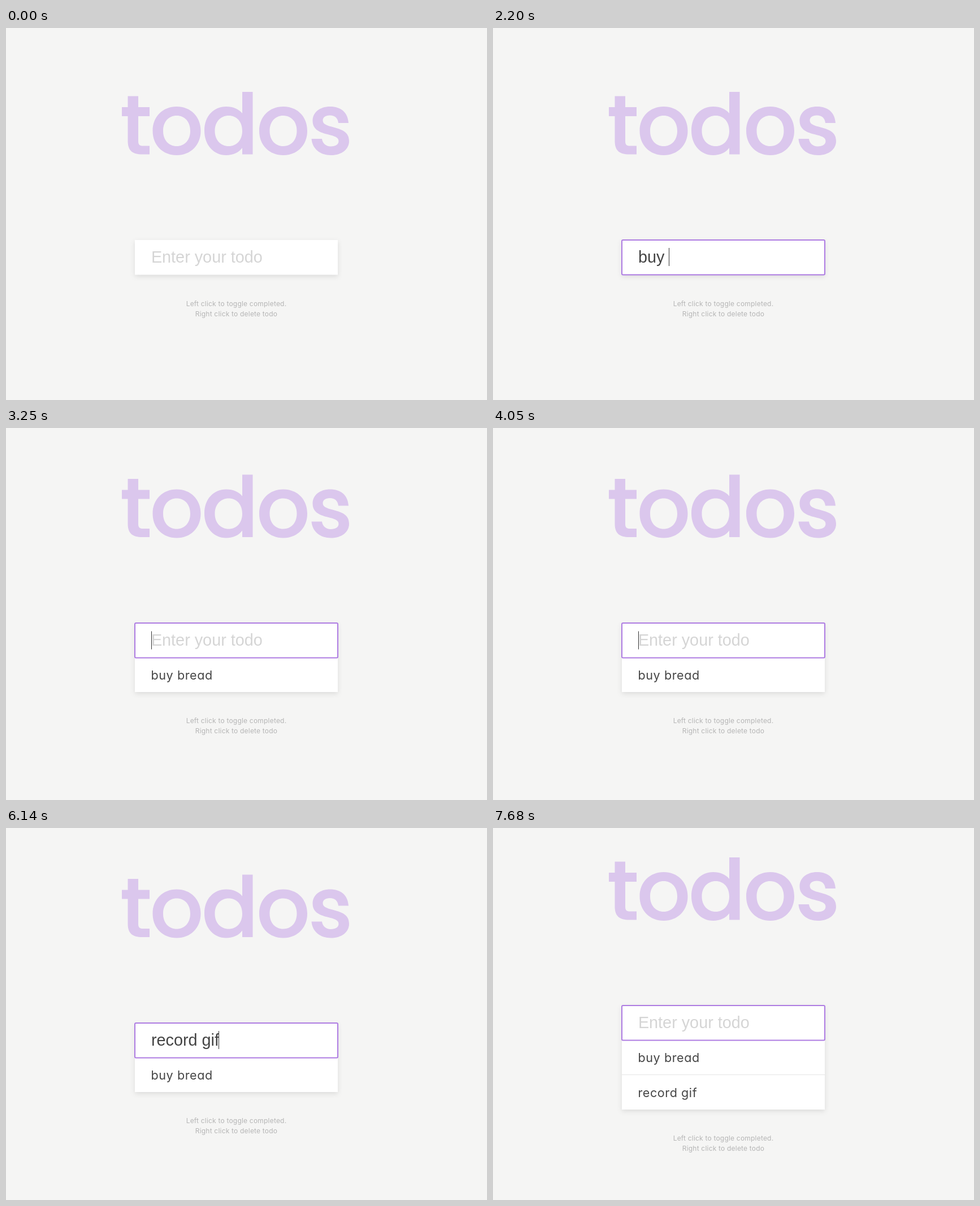
Recreate the animation shown at these times as an HTML page. Size 851 px wide and 658 px high, loop 8000 ms.

```html
<!DOCTYPE html>
<html lang="en">
<head>
<meta charset="utf-8">
<title>Todo list</title>
<style>
  html, body { margin: 0; width: 100%; height: 100%; overflow: hidden; background: #f5f5f4; }
  svg { display: block; width: 100%; height: 100%; }
  text { white-space: pre; }
  .heading { fill: #dbc7ed; }
  .card { fill: #fff; filter: drop-shadow(0 3.6px 4.5px rgba(0, 0, 0, .1)); }
  .ring { fill: none; stroke: #ae7ce2; stroke-width: 2; }
  .field { font: 28.8px "Liberation Sans", Arial, sans-serif; fill: #444; }
  .field.placeholder { fill: #d5d5d5; }
  .item { font: 21.6px Inter, "Open Sans", sans-serif; font-feature-settings: "cv11"; letter-spacing: .55px; fill: #444; }
  .hint { font: 12px Inter, "Open Sans", sans-serif; font-feature-settings: "cv11"; letter-spacing: .2px; fill: #b5b5b5; text-anchor: middle; }
</style>
</head>
<body>
<svg viewBox="0 0 851 658">
  <g id="heading" class="heading" fill-rule="evenodd" role="heading" aria-level="1" aria-label="todos">
    <path d="M215.5 120.5H234V140H254V156H234V200C234 206.5 236.5 208.5 242 208.5H254V223.5H241C224 223.5 215.5 217 215.5 200V156H205V140H215.5Z"/>
    <path id="o" d="M302 139C326.500 139 344.500 156.500 344.500 182S326.500 225 302 225S259.500 207.500 259.500 182S277.500 139 302 139ZM302 155C288 155 278 165.500 278 182S288 209 302 209S326 198.500 326 182S316 155 302 155Z"/>
    <path d="M418 113H436.500V223.500H418V212C412 220 402 225 389.500 225C367.500 225 351 207 351 181.500S367.500 139 389.500 139C402 139 412 143.500 418 151ZM394 155C380 155 369.500 165.500 369.500 182S380 209 394 209S418 198.500 418 182S408 155 394 155Z"/>
    <use href="#o" x="188.500"/>
    <path d="M540.500 196H559C560 204 566 209.500 574.500 209.500C583 209.500 588.500 206 588.500 200C588.500 193 580 191 570.500 188.500C557 185 542.500 181 542.500 164C542.500 149.500 555 139 573.500 139C592.500 139 605 149.500 606 168H588C587 159.500 582 154.500 573 154.500C565 154.500 560.500 158.300 560.500 163.500C560.500 170.500 569 172.800 578.500 175.300C592 179 607 182.800 607 200C607 214.500 594 225 575 225C556 225 542 214 540.500 196Z"/>
  </g>

  <rect id="card" class="card" x="228" width="359"/>
  <rect id="divider" x="228" y="436" width="359" height="1" fill="#e5e5e5"/>
  <text id="item1" class="item" x="256.5">buy bread</text>
  <text id="item2" class="item" x="256.5" y="475.5">record gif</text>
  <rect id="ring" class="ring" x="228" width="359" height="61.5" rx="2"/>
  <text id="placeholder" class="field placeholder" x="256.9">Enter your todo</text>
  <text id="typed" class="field" x="256.9" xml:space="preserve"></text>
  <rect id="caret" width="1" height="32" fill="#333"/>

  <g id="hint">
    <text class="hint" x="407.5" y="492">Left click to toggle completed.</text>
    <text class="hint" x="407.5" y="510">Right click to delete todo</text>
  </g>
</svg>
<script>
const LOOP = 8000, FOCUS = 660, BLINK = 530, LEFT = 256.9;

// Each entry: its text, the time of every keystroke, and the time it is added.
const entries = [
  { text: "buy bread", keys: [1670, 1870, 2000, 2200, 2390, 2460, 2650, 2780, 2990], add: 3250 },
  { text: "record gif", keys: [4450, 4580, 4850, 4920, 5060, 5260, 5330, 5660, 5790, 6140], add: 6540 }
];

// Layout by number of items in the list.
const layouts = [
  { head: 0, top: 375, bottom: 436.5, base: 415, empty: 390, hint: 0 },
  { head: -30.5, top: 345, bottom: 467, base: 385, empty: 359.5, hint: 30, item: 445 },
  { head: -61, top: 314, bottom: 498, base: 354, empty: 329, hint: 61, item: 414.3 }
];

const $ = id => document.getElementById(id);
const set = (id, name, value) => $(id).setAttribute(name, value);
const show = (id, on) => set(id, "visibility", on ? "visible" : "hidden");

const pen = document.createElement("canvas").getContext("2d");
pen.font = '28.8px "Liberation Sans", Arial, sans-serif';

function caretOn(t, typing) {
  if (t < FOCUS) return false;
  if (typing) return true;
  if (t < 1670) return t < 1120;
  if (t < 4450) return t < 3520 || t >= 3520 + BLINK;
  return t < 6620 || (t >= 6620 + BLINK && t < 6620 + 2 * BLINK);
}

function draw(t) {
  const count = entries.filter(e => t >= e.add).length;
  const box = layouts[count];
  const entry = entries[count];
  const text = entry ? entry.text.slice(0, entry.keys.filter(k => t >= k).length) : "";

  set("heading", "transform", `translate(0 ${box.head})`);
  set("hint", "transform", `translate(0 ${box.hint})`);
  set("card", "y", box.top);
  set("card", "height", box.bottom - box.top);
  set("ring", "y", box.top);
  set("placeholder", "y", box.base);
  set("typed", "y", box.base);
  set("item1", "y", box.item || 0);
  $("typed").textContent = text;

  set("caret", "x", text ? Math.floor(LEFT + pen.measureText(text).width) : 257);
  set("caret", "y", text ? box.base - 26 : box.empty);

  show("ring", t >= FOCUS);
  show("placeholder", !text);
  show("caret", caretOn(t, text));
  show("item1", count > 0);
  show("item2", count > 1);
  show("divider", count > 1);
}

const start = performance.now();
function tick() {
  draw((performance.now() - start) % LOOP);
  requestAnimationFrame(tick);
}
tick();
</script>
</body>
</html>
```
